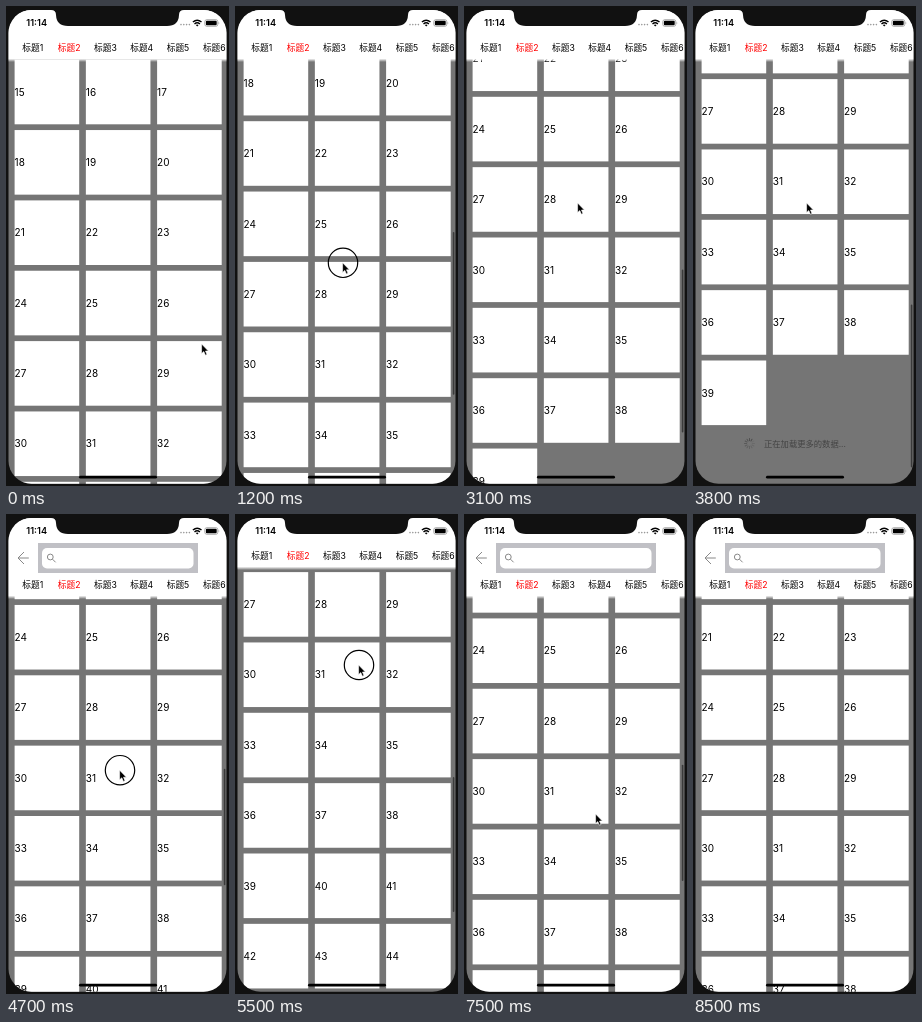
Write an HTML page that moves like this. It is 223x480 px and loops after 9.2 s.

```html
<!DOCTYPE html>
<html lang="zh">
<head>
<meta charset="utf-8">
<title>Collapsing search header</title>
<style>
html, body { margin: 0; width: 100%; height: 100%; overflow: hidden; background: #111; }
svg { display: block; width: 100%; height: 100%; }
text { font-family: Inter, "Noto Sans CJK SC", "Noto Sans CJK", sans-serif; }
#rows text { font-size: 10px; }
#tabs text { font-size: 8.7px; text-anchor: middle; }
#tabs .on { fill: #f00; }
#footer text { font-size: 8.3px; fill: #444; }
</style>
</head>
<body>
<svg viewBox="0 0 223 480">
  <defs>
    <clipPath id="screen"><rect x="2.5" y="4" width="218" height="473.8" rx="23"/></clipPath>
    <linearGradient id="shade" x1="0" y1="0" x2="0" y2="1">
      <stop offset="0" stop-color="#fff" stop-opacity=".9"/>
      <stop offset="1" stop-color="#fff" stop-opacity="0"/>
    </linearGradient>
  </defs>
  <rect width="223" height="480" fill="#111"/>
  <g clip-path="url(#screen)">
    <rect width="223" height="480" fill="#757575"/>
    <g id="rows"></g>
    <g id="footer">
      <g id="spinner" stroke="#444" stroke-linecap="round"></g>
      <text x="71" y="3">正在加载更多的数据...</text>
    </g>
    <rect id="thumb" x="217.8" width="1.6" rx=".8" fill-opacity=".5"/>
    <rect id="header" width="223" fill="#fff"/>
    <rect id="edge" width="223" height="3" fill="url(#shade)"/>
    <g id="search">
      <rect x="32" y="29" width="160" height="30" fill="#c0c0c5"/>
      <rect x="36" y="34" width="151.5" height="20.5" rx="5" fill="#fff"/>
      <g fill="none" stroke="#888">
        <circle cx="44.3" cy="43" r="2.9"/>
        <path d="M46.5 45.2L49.6 48.3M22.8 44H12M18 38L12 44L18 50"/>
      </g>
    </g>
    <g id="tabs"></g>
    <text x="20.3" y="20.3" font-size="9.2" font-weight="600">11:14</text>
    <path d="M175 18.6h9" stroke="#999" stroke-width="1.6" stroke-linecap="round" stroke-dasharray="0 2.8"/>
    <path d="M186.9 16.1Q191.2 12.3 195.5 16.1M188.5 18Q191.2 15.6 193.9 18" fill="none" stroke="#000" stroke-width="1.4"/>
    <path d="M189.8 19.1Q191.2 17.9 192.6 19.1L191.2 20.6Z"/>
    <rect x="198.8" y="13.7" width="13" height="6.6" rx="2" fill="none" stroke="#888" stroke-width=".7"/>
    <rect x="199.9" y="14.8" width="10.8" height="4.4" rx="1"/>
    <path d="M212.7 15.7Q214 17 212.7 18.3Z" fill="#888"/>
    <rect x="73" y="469.8" width="78" height="2.8" rx="1.4"/>
  </g>
  <path d="M45 0V4Q50 4 50 9Q50.5 20 62 20H161Q172.5 20 173 9Q173 4 178 4V0Z" fill="#111"/>
  <g id="pointer">
    <circle id="touch" r="14.7" fill="none" stroke="#000" stroke-width="1.2"/>
    <path d="M-.4 0V9.6L1.8 7.6L3.4 11.2L5 10.5L3.5 7H6.4Z" stroke="#fff" stroke-width=".6"/>
  </g>
</svg>
<script>
const LOOP = 9200, STEP = 100, LEAVE = 8000, STOP = 8500;
const PITCH = 70.35, COLUMN = 71.25, FOOTER_PAD = 85, LOADED_AT = 4200;
const BOTTOM = 478, HEADER_SHORT = 53, HEADER_GROW = 29, HEADER_TIME = 250;
const FIRST_SCROLL = 265.75, FLING_TIME = 800;

// Dragging down opens the header, dragging up closes it;
// fling is the distance still scrolled after release.
const swipes = [
  { start: 800, end: 1300, x: 108, from: 336, to: 237, fling: 55 },
  { start: 2100, end: 2600, x: 111, from: 190, to: 295, fling: 0 },
  { start: 2700, end: 3000, x: 114, from: 295, to: 197, fling: 115 },
  { start: 4300, end: 4800, x: 114, from: 197, to: 271, fling: 0 },
  { start: 5000, end: 5500, x: 124, from: 240, to: 151, fling: 97 },
  { start: 6300, end: 7200, x: 132, from: 204, to: 300, fling: -145.5 }
];

const $ = id => document.getElementById(id);
const progress = (t, a, b) => Math.max(0, Math.min(1, (t - a) / (b - a)));
const mix = (a, b, p) => a + (b - a) * p;
const easeOut = p => 1 - (1 - p) ** 2;
const move = (el, x, y) => el.setAttribute("transform", `translate(${x} ${y})`);

function add(parent, tag, attrs, label = "") {
  const el = document.createElementNS("http://www.w3.org/2000/svg", tag);
  for (const name in attrs) el.setAttribute(name, attrs[name]);
  el.textContent = label;
  parent.append(el);
  return el;
}

const cells = Array.from({ length: 50 }, (_, n) => {
  const cell = add($("rows"), "g", {});
  move(cell, 8.6 + n % 3 * COLUMN, Math.floor(n / 3) * PITCH);
  add(cell, "rect", { y: -32.3, width: 64.6, height: 64.6, fill: "#fff" });
  add(cell, "text", { y: 3.7 }, n);
  return cell;
});

for (let i = 0; i < 6; i++)
  add($("tabs"), "text", { x: 26.8 + i * 36.3, y: 44.6, class: i === 1 ? "on" : "" }, "标题" + (i + 1));

for (let i = 0; i < 12; i++)
  add($("spinner"), "path", { d: "M0 -2.8V-5", transform: `rotate(${i * 30})`, opacity: 0.15 + i * 0.06 });

// Replays every swipe begun so far
function poseAt(t) {
  let scroll = FIRST_SCROLL, open = 0, touching = false;
  let x = 196, y = 338, freeAt = 0;
  for (const s of swipes) {
    const approach = progress(t, freeAt, s.start);
    x = mix(x, s.x, approach);
    y = mix(y, s.from, approach);
    if (t < s.start) break;

    const drag = progress(t, s.start, s.end);
    y = mix(s.from, s.to, drag);
    const wasOpen = open;
    open = mix(open, s.to > s.from ? 1 : 0, progress(t, s.start, s.start + HEADER_TIME));
    scroll += s.from - y - HEADER_GROW * (open - wasOpen);
    scroll += s.fling * easeOut(progress(t, s.end, s.end + FLING_TIME));
    touching = t <= s.end;
    freeAt = s.end;
  }
  const leave = progress(t, LEAVE, STOP);
  return { scroll, open, touching, x: mix(x, 14, leave), y: mix(y, -20, leave) };
}

function draw(t) {
  const { scroll, open, touching, x, y } = poseAt(t);
  const count = t < LOADED_AT ? 40 : 50, rows = Math.ceil(count / 3);
  const top = HEADER_SHORT + HEADER_GROW * open;

  move($("rows"), 0, -scroll);
  cells.forEach((cell, n) => cell.style.display = n < count ? "" : "none");
  move($("footer"), 0, (rows - 1) * PITCH + 50.7 - scroll);
  $("spinner").setAttribute("transform", `translate(56.5 0) rotate(${t / STEP * 30})`);

  $("header").setAttribute("height", top);
  $("edge").setAttribute("y", top);
  $("search").style.opacity = open;
  move($("tabs"), 0, HEADER_GROW * open);

  const view = BOTTOM - top, ratio = view / (rows * PITCH + FOOTER_PAD);
  $("thumb").setAttribute("y", top + (scroll + 37.5 + top) * ratio);
  $("thumb").setAttribute("height", view * ratio - 6);
  $("thumb").style.opacity = progress(t, 700, 800) - progress(t, 8100, STOP);

  move($("pointer"), x, y);
  $("touch").style.display = touching ? "" : "none";
}

const start = performance.now();
function tick() {
  const t = (performance.now() - start) % LOOP;
  draw(Math.min(Math.floor(t / STEP) * STEP, STOP));
  requestAnimationFrame(tick);
}
tick();
</script>
</body>
</html>
```
